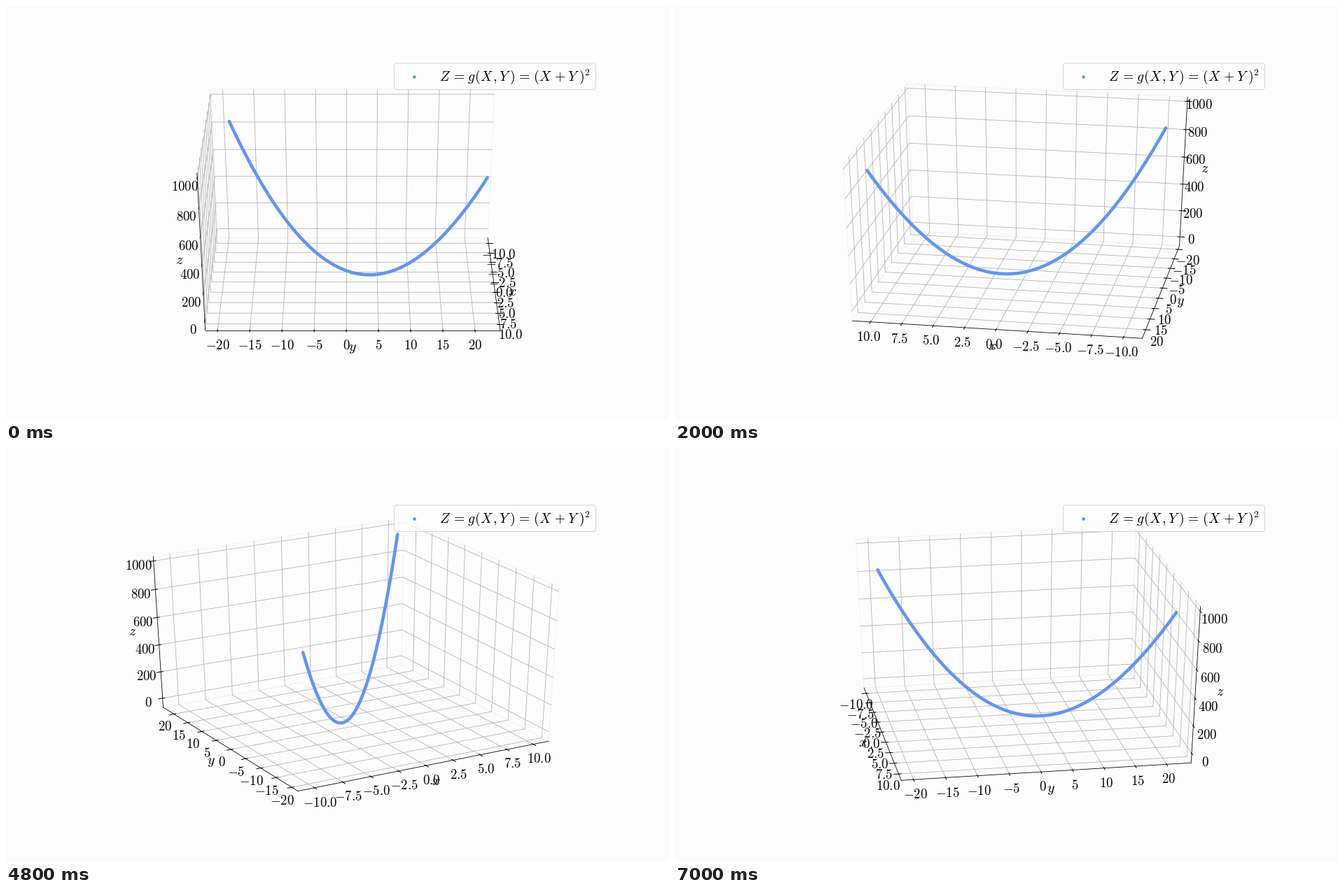
A matplotlib script for the animation above (7.2 s loop, 947 by 592 pixels).

```python
import numpy as np
import matplotlib.pyplot as plt
from matplotlib.animation import FuncAnimation
from matplotlib.patches import FancyBboxPatch

W, H, DPI = 947, 592, 72          # at 72 dpi one point is one pixel
FRAMES, INTERVAL = 36, 200
BG, BLUE, GRID, PANE = "#fcfcfc", "#6495ed", "#b0b0b0", "#f2f2f2"

plt.rcParams["mathtext.fontset"] = "cm"

# Plot area and perspective
LEFT, TOP = 0.125 * W, 0.12 * H
AREA_W, AREA_H = 0.775 * W, 0.755 * H
SCALE = np.array([AREA_W, -AREA_H]) / 0.185
CENTER = np.array([LEFT + AREA_W * 0.095 / 0.185, TOP + AREA_H * 0.09 / 0.185])
DIST, ELEV = 10, np.radians(30)

# Data ranges, mapped to a unit cube around the origin
LO = np.array([-11, -21, -48.05])
HI = np.array([11, 23, 1009.05])
EDGE = 0.5 + 1 / 48
STEP = 1 / 12
PER_POINT = 48 / (AREA_W + AREA_H) * STEP
TICK_GAP, NAME_GAP = 11.5 * PER_POINT, 21 * PER_POINT

FONT, TICK_FONT, LEGEND_FONT = 20, 18.8, 19.55
ASCENT, DESCENT = 0.694 * FONT, 0.194 * FONT

# Per axis: name, tick values, number format, direction in which it is flipped to the front
AXES = [
    ("x", np.arange(-10, 10.1, 2.5), "%.1f", 1),
    ("y", np.arange(-20, 21, 5), "%d", 0),
    ("z", np.arange(0, 1001, 200), "%d", 0),
]

FORMULA = (r"$Z\hspace{0.2}=\hspace{0.12}g\hspace{0.04}(X\hspace{0.09},Y\hspace{0.25})"
           r"\hspace{0.12}=\hspace{0.12}(X\hspace{0.14}+\hspace{0.05}Y\hspace{0.25})^2$")

t = np.linspace(-10, 10, 400)
CURVE = (np.column_stack([t, 2 * t + 1, (3 * t + 1) ** 2]) - LO) / (HI - LO) - 0.5

fig = plt.figure(figsize=(W / DPI, H / DPI), dpi=DPI, facecolor=BG)
ax = fig.add_axes([0, 0, 1, 1])


def camera(azim):
    """Directions of the screen's right, its up, and towards the viewer."""
    c, s = np.cos(azim), np.sin(azim)
    ce, se = np.cos(ELEV), np.sin(ELEV)
    return np.array([[-s, c, 0], [-c * se, -s * se, ce], [c * ce, s * ce, se]])


def project(points, cam):
    q = np.asarray(points) @ cam.T
    return CENTER + SCALE * q[..., :2] / (DIST - q[..., 2:])


def flipped(point, *dims):
    p = np.array(point, float)
    for d in dims:
        p[d] = -p[d]
    return p


def moved(point, dim, value):
    p = np.array(point, float)
    p[dim] = value
    return p


def outward(point, along, gap):
    """Push a point away from the cube's centre, except along its own axis."""
    p = point + np.sign(point) * gap
    p[along] = point[along]
    return p


def stroke(points, cam, color, width, **kw):
    xy = project(points, cam)
    ax.plot(xy[:, 0], xy[:, 1], color=color, lw=width, **kw)


def label(xy, text, size):
    ax.text(xy[0], xy[1], f"${text}$", size=size, color="black",
            ha="center", va="baseline")


def draw_panes(far, cam):
    for i in range(3):
        a, b = (i + 1) % 3, (i + 2) % 3
        corners = [far, flipped(far, a), flipped(far, a, b), flipped(far, b), far]
        stroke(corners, cam, PANE, 1, zorder=1)


def draw_axis(i, far, cam):
    name, values, fmt, side = AXES[i]
    start = flipped(far, side)
    stroke([start, flipped(start, i)], cam, "black", 0.8)

    x, y = project(outward(moved(start, i, 0), i, NAME_GAP), cam)
    label((x, y + (ASCENT - DESCENT) / 2), name, FONT)

    sign = np.sign(start[side])
    for value in values:
        u = (value - LO[i]) / (HI[i] - LO[i]) - 0.5
        corner = moved(far, i, u)
        stroke([flipped(corner, (i + 1) % 3), corner, flipped(corner, (i + 2) % 3)],
               cam, GRID, 0.8, zorder=1.5)

        at = moved(start, i, u)
        ends = [moved(at, side, at[side] + sign * k * STEP) for k in (-0.1, 0.2)]
        stroke(ends, cam, "black", 1)
        x, y = project(outward(at, i, TICK_GAP), cam)
        label((x, y + ASCENT), fmt % value, TICK_FONT)


def draw_legend():
    ax.add_patch(FancyBboxPatch(
        (554.5, 81.8), 287.8, 37.7, boxstyle="round,pad=0,rounding_size=4",
        fc=BG, ec="#cccccc", lw=1, alpha=0.8, zorder=5))
    ax.plot([583], [101.3], "o", ms=4.6, mew=0, color=BLUE, zorder=6)
    ax.text(619, 107, FORMULA, size=LEGEND_FONT, color="black",
            ha="left", va="baseline", zorder=6)


def draw(frame):
    ax.clear()
    ax.set(xlim=(0, W), ylim=(H, 0))
    ax.axis("off")
    cam = camera(np.radians(360 / FRAMES * frame))
    far = np.where(cam[2] < 0, EDGE, -EDGE)
    draw_panes(far, cam)
    for i in range(3):
        draw_axis(i, far, cam)
    stroke(CURVE, cam, BLUE, 4.6, solid_capstyle="round", zorder=4)
    draw_legend()
    return []


anim = FuncAnimation(fig, draw, frames=FRAMES, init_func=lambda: draw(0),
                     interval=INTERVAL, repeat=True, repeat_delay=0)
plt.show()
```
